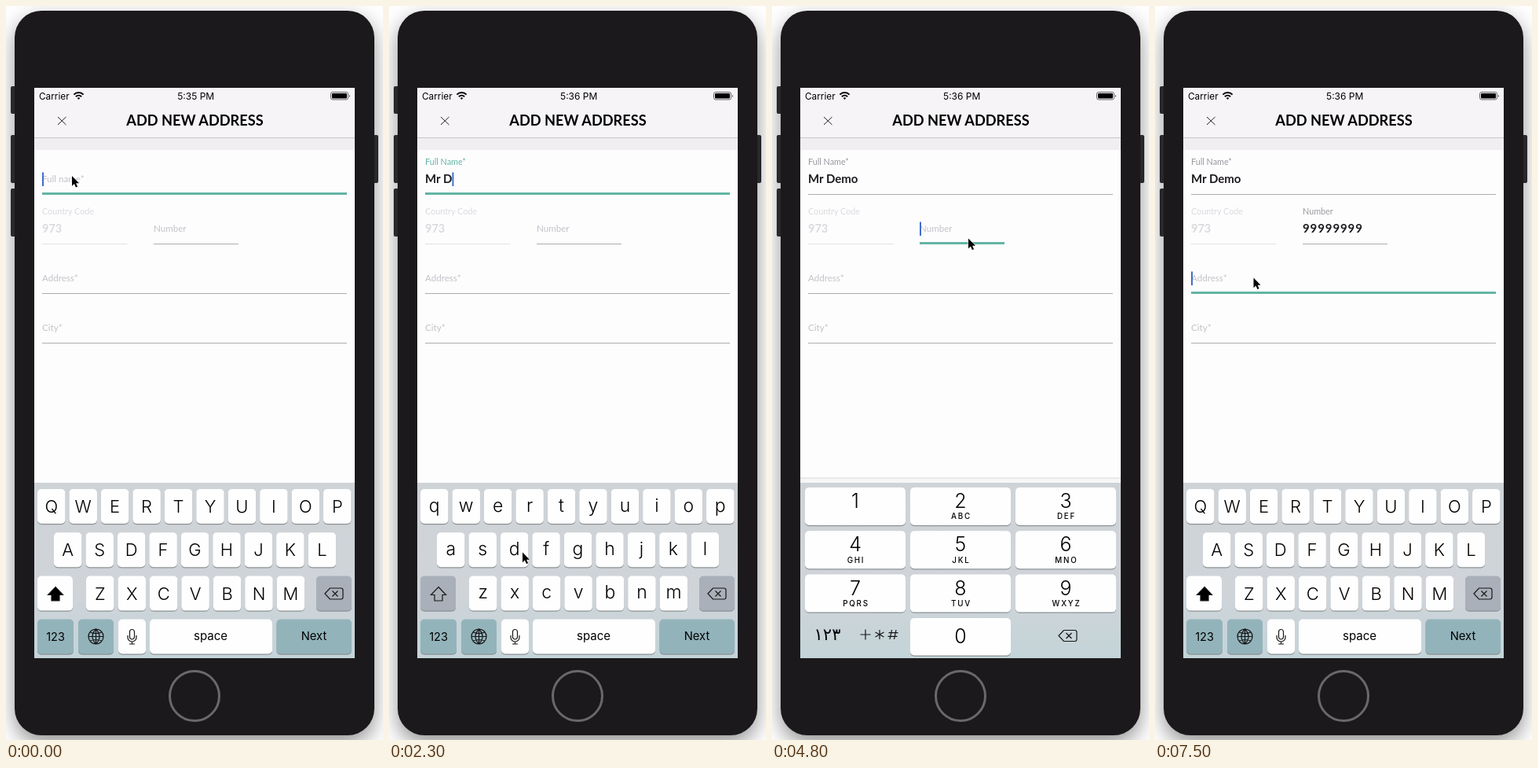
Write an HTML page that moves like this. It is 480 px wide and 933 px high and loops after 8000 ms.

```html
<!DOCTYPE html>
<html lang="en">
<head>
<meta charset="utf-8">
<title>Add new address</title>
<style>
html, body { margin: 0; width: 100%; height: 100%; overflow: hidden; background: #fefefe; }
svg { display: block; width: 100%; height: 100%; }
text { font-family: Lato, "Open Sans", sans-serif; white-space: pre; }
.ui { font-family: Inter, Roboto, sans-serif; }
.mid { text-anchor: middle; }
.ico { fill: none; stroke: #161616; stroke-width: 1.2; }
</style>
</head>
<body>
<svg viewBox="0 0 480 933">
  <defs>
    <filter id="soft" x="-20%" y="-20%" width="140%" height="140%"><feGaussianBlur stdDeviation="13"/></filter>
    <linearGradient id="board" x2="0" y2="1">
      <stop offset="0" stop-color="#ced3d7"/><stop offset=".6" stop-color="#d0d4d9"/><stop offset="1" stop-color="#c3d4d8"/>
    </linearGradient>
  </defs>
  <rect x="11" y="16" width="458" height="921" rx="34" opacity=".42" filter="url(#soft)"/>
  <g fill="#29282b">
    <rect x="6" y="102" width="8" height="35" rx="2"/>
    <rect x="6" y="164" width="8" height="61" rx="2"/>
    <rect x="6" y="232" width="8" height="61" rx="2"/>
    <rect x="466" y="164" width="8" height="61" rx="2"/>
  </g>
  <rect x="11" y="6" width="458" height="921" rx="34" fill="#1b191c"/>
  <circle cx="240" cy="877" r="31.5" fill="none" stroke="#69686b" stroke-width="3"/>

  <rect x="36" y="104" width="408" height="725" fill="#fefdfe"/>
  <rect x="36" y="104" width="408" height="63" fill="#f6f4f7"/>
  <rect x="36" y="167" width="408" height="16" fill="#f0eef1"/>
  <path d="M36 167.5h408" stroke="#c9c7ca"/>
  <text class="ui" x="42" y="118.7" font-size="11.8">Carrier</text>
  <text class="ui mid" id="clock" x="241.7" y="118.7" font-size="12"></text>
  <g fill="none" stroke="#000" stroke-width="2">
    <path d="M86.4 112.6a8.7 8.7 0 0 1 12.2 0M88.9 115.2a5.1 5.1 0 0 1 7.2 0"/>
    <path d="M92.5 119l-1.8-2a2.6 2.6 0 0 1 3.6 0z" fill="#000" stroke="none"/>
  </g>
  <rect x="413.5" y="109.5" width="22" height="9.5" rx="2.3" fill="none" stroke="#555" stroke-width=".9"/>
  <rect x="415" y="111" width="19" height="6.5" rx="1"/>
  <path d="M437 112.4q1.6 1.9 0 3.8z"/>
  <path d="M66 141l10.500 10M76.500 141l-10.500 10" stroke="#222"/>
  <text class="mid" x="240.500" y="151.500" font-size="18.200" font-weight="700">ADD NEW ADDRESS</text>

  <text x="46" y="264.500" font-size="10.800" fill="#dbd9dd">Country Code</text>
  <text x="46" y="288" font-size="14.500" font-weight="700" fill="#dbd9dd">973</text>
  <path d="M46 302.500h108.500" stroke="#e1dfe3"/>
  <g id="form"></g>
  <g id="keys"></g>
  <path id="mouse" d="M0 0V12.700L2.900 10 4.900 14.600 7.100 13.700 5.100 9.200H9Z" stroke="#fff" stroke-width="1" paint-order="stroke"/>
</svg>
<script>
const LOOP = 8000, STEP = 100;
const TEAL = '#64b5a5', GREY = '#99979c', PALE = '#c3c1c7';
const NAME = 'Mr Demo', NAME_KEYS = [1000, 1500, 2000, 2300, 2400, 2500, 2600];
const PHONE = '9'.repeat(8), PHONE_KEYS = [5300, 5600, 5800, 6000, 6100, 6200, 6400, 6600];
const TO_PHONE = 4800, TO_ADDRESS = 7500;
// Pointer path: start, end, then a cubic as four points
const MOVES = [
  [0, 600, 84, 216, 110, 340, 160, 560, 170, 694.5],
  [2900, 3300, 170, 694.5, 235, 728, 300, 762, 364, 794],
  [3400, 4300, 364, 794, 520, 740, 480, 380, 250, 295.5],
  [6900, 7300, 250, 295.5, 210, 312, 165, 330, 125.5, 345.5]
];
const $ = id => document.getElementById(id);
const ramp = (t, a, b) => Math.max(0, Math.min(1, (t - a) / (b - a)));
const ease = p => (1 - Math.cos(Math.PI * p)) / 2;
const typed = (text, times, t) => text.slice(0, times.filter(k => k <= t).length);

const text = (x, y, size, s, more = '') => `<text x="${x}" y="${y}" font-size="${size}" ${more}>${s}</text>`;
const label = (x, y, size, s, more = '') => text(x, y, size, s, 'class="ui mid" ' + more);
const icon = (x, y, d, more = '') => `<path class="ico" transform="translate(${x} ${y})" d="${d}" ${more}/>`;
const key = (x, y, w, h, fill = '#fefefe') =>
  `<rect x="${x}" y="${y + 1.2}" width="${w}" height="${h}" rx="5" fill="#8c9296"/>` +
  `<rect x="${x}" y="${y}" width="${w}" height="${h}" rx="5" fill="${fill}"/>`;
const erase = (x, y) => icon(x, y, 'M-11.5 0L-5 -7H9Q11.500 -7 11.500 -4.500V4.500Q11.500 7 9 7H-5ZM-2 -3.500L5 3.500M5 -3.500L-2 3.500');
const backdrop = '<rect x="36" y="606" width="408" height="223" fill="url(#board)"/>';

function letters(upper) {
  const dark = '#a9b0b9', tint = '#93b3bb';
  let s = backdrop;
  [['QWERTYUIOP', 40], ['ASDFGHJKL', 61], ['ZXCVBNM', 102]].forEach(([row, x0], r) => {
    const y = 614 + r * 55.3;
    [...row].forEach((c, i) => {
      const x = x0 + i * 40.45;
      s += key(x, y, 35.5, 44) + label(x + 17.75, y + (upper ? 30 : 28.5), upper ? 22 : 23,
        upper ? c : c.toLowerCase(), 'font-weight="300"');
    });
  });
  s += key(40, 724.6, 45, 44, upper ? '#fefefe' : dark) +
    icon(63, 747.5, 'M0 -9L9.500 1H5V8.500H-5V1H-9.500Z', upper ? 'style="fill:#000"' : '');
  s += key(395, 724.6, 45, 44, dark) + erase(417.5, 747);
  s += key(40, 779.5, 46, 44, tint) + label(63, 807, 14.5, '123');
  s += key(92, 779.5, 45, 44, tint) + icon(114.5, 801.5,
    'M-9.500 0A9.500 9.500 0 1 1 9.500 0A9.500 9.500 0 1 1 -9.500 0ZM0 -9.500V9.500M-9.500 0H9.500' +
    'M0 -9.500Q-9 0 0 9.500M0 -9.500Q9 0 0 9.500M-7.500 -5.500Q0 -2.500 7.500 -5.500M-7.500 5.500Q0 2.500 7.500 5.500');
  s += key(143, 779.5, 35, 44) + icon(160.5, 801,
    'M-3 -5.500A3 3 0 0 1 3 -5.500V1A3 3 0 0 1 -3 1ZM-5.500 -1V1.500A5.500 5.500 0 0 0 5.500 1.500V-1M0 7V10M-3.500 10H3.500');
  s += key(183, 779.5, 156, 44) + label(260.5, 805.5, 15, 'space');
  return s + key(344.5, 779.5, 95.5, 44, tint) + label(392, 805.5, 14.8, 'Next');
}

function digits(t) {
  const top = 606 - 44 * ease(ramp(t, TO_PHONE - STEP, TO_PHONE + 300));
  let s = `<rect x="36" y="${top}" width="408" height="45" fill="#f7f7f8"/>` +
    `<path d="M36 ${top + .5}h408" stroke="#d9d9db"/>` +
    label(412, top + 28.7, 10.8, 'Next', 'fill="#2f7fe0"') + backdrop;
  ['', 'ABC', 'DEF', 'GHI', 'JKL', 'MNO', 'PQRS', 'TUV', 'WXYZ'].forEach((sub, i) => {
    const x = 42 + i % 3 * 134, y = 612 + Math.floor(i / 3) * 55.3;
    s += key(x, y, 128, 48) + label(x + 64, y + 26, 25, i + 1, 'font-weight="300"') +
      label(x + 65, y + 40.3, 9.8, sub, 'font-weight="500" letter-spacing="1.800"');
  });
  s += key(176, 778, 128, 47.5) + label(240, 809.5, 25, 0, 'font-weight="300"');
  s += text(70.5, 806, 21, '١٢٣', 'text-anchor="middle" style="font-family:\'DejaVu Sans\',sans-serif"');
  s += icon(119, 799, 'M-6.500 0H6.500M0 -6.500V6.500');
  s += icon(137, 799, 'M0 -6V6M-5.500 -3L5.500 3M-5.500 3L5.500 -3');
  s += icon(154, 799, 'M-1.500 -6L-4 6M4 -6L1.500 6M-5.500 -2.300H6.500M-6.500 2.300H5.500');
  return s + erase(376.5, 800.5);
}

function field(t, o) {
  const { x = 46, y, w = 388, hint, title = hint, value = '', on, since, gap = 0 } = o;
  let s = on ? `<path d="M${x} ${y - 1}h${w}" stroke="${TEAL}" stroke-width="3"/>`
             : `<path d="M${x} ${y}h${w}" stroke="#aeacb1"/>`;
  if (value) {
    const p = ease(ramp(t, since, since + 220));
    s += text(x, y - 38 + 13 * (1 - p), 10.8, title, `fill="${on ? TEAL : GREY}" opacity="${p}"`);
  } else s += text(x, y - 15.5, 11.6, hint, `fill="${PALE}"`);
  s += text(x, y - 14.5, 15, value, `${on ? 'id="value"' : ''} font-weight="700" fill="#1d1b1f" letter-spacing="${gap}"`);
  return s + (on ? `<rect id="caret" x="${x}" y="${y - 28}" width="2" height="17.500" fill="#3f6fcb"/>` : '');
}

// Caret holds after a key, then fades out and back in
function blink(t) {
  const last = Math.max(...[-350, ...NAME_KEYS, TO_PHONE, ...PHONE_KEYS, TO_ADDRESS].filter(k => k <= t));
  const p = (t - last) % 1100;
  return 1 - ramp(p, 400, 650) + ramp(p, 850, 1050);
}

function pointer(t) {
  const m = MOVES.filter(m => m[0] <= t).pop();
  const p = ease(ramp(t, m[0], m[1])), q = 1 - p;
  const at = i => q * q * q * m[i] + 3 * q * q * p * m[i + 2] + 3 * q * p * p * m[i + 4] + p * p * p * m[i + 6];
  return `translate(${at(2)} ${at(3)})`;
}

function draw(t) {
  const focus = t < TO_PHONE ? 0 : t < TO_ADDRESS ? 1 : 2;
  $('clock').textContent = t < 1600 ? '5:35 PM' : '5:36 PM';
  $('form').innerHTML =
    field(t, { y: 239.5, hint: 'Full name*', title: 'Full Name*', value: typed(NAME, NAME_KEYS, t), on: focus == 0, since: NAME_KEYS[0] }) +
    field(t, { x: 188, w: 108, y: 302.5, hint: 'Number', value: typed(PHONE, PHONE_KEYS, t), on: focus == 1, since: PHONE_KEYS[0], gap: .9 }) +
    field(t, { y: 365.5, hint: 'Address*', on: focus == 2 }) +
    field(t, { y: 428.5, hint: 'City*' });
  const caret = $('caret');
  caret.setAttribute('x', +caret.getAttribute('x') + $('value').getComputedTextLength());
  caret.setAttribute('opacity', blink(t));
  const upper = t < NAME_KEYS[0] || (t >= NAME_KEYS[2] && t < NAME_KEYS[3]) || focus == 2;
  $('keys').innerHTML = focus == 1 ? digits(t) : letters(upper);
  $('mouse').setAttribute('transform', pointer(t));
}

let start, shown;
function tick(now) {
  start ??= now;
  const t = Math.floor((now - start) % LOOP / STEP) * STEP;
  if (t !== shown) draw(shown = t);
  requestAnimationFrame(tick);
}
draw(0);
requestAnimationFrame(tick);
</script>
</body>
</html>
```
